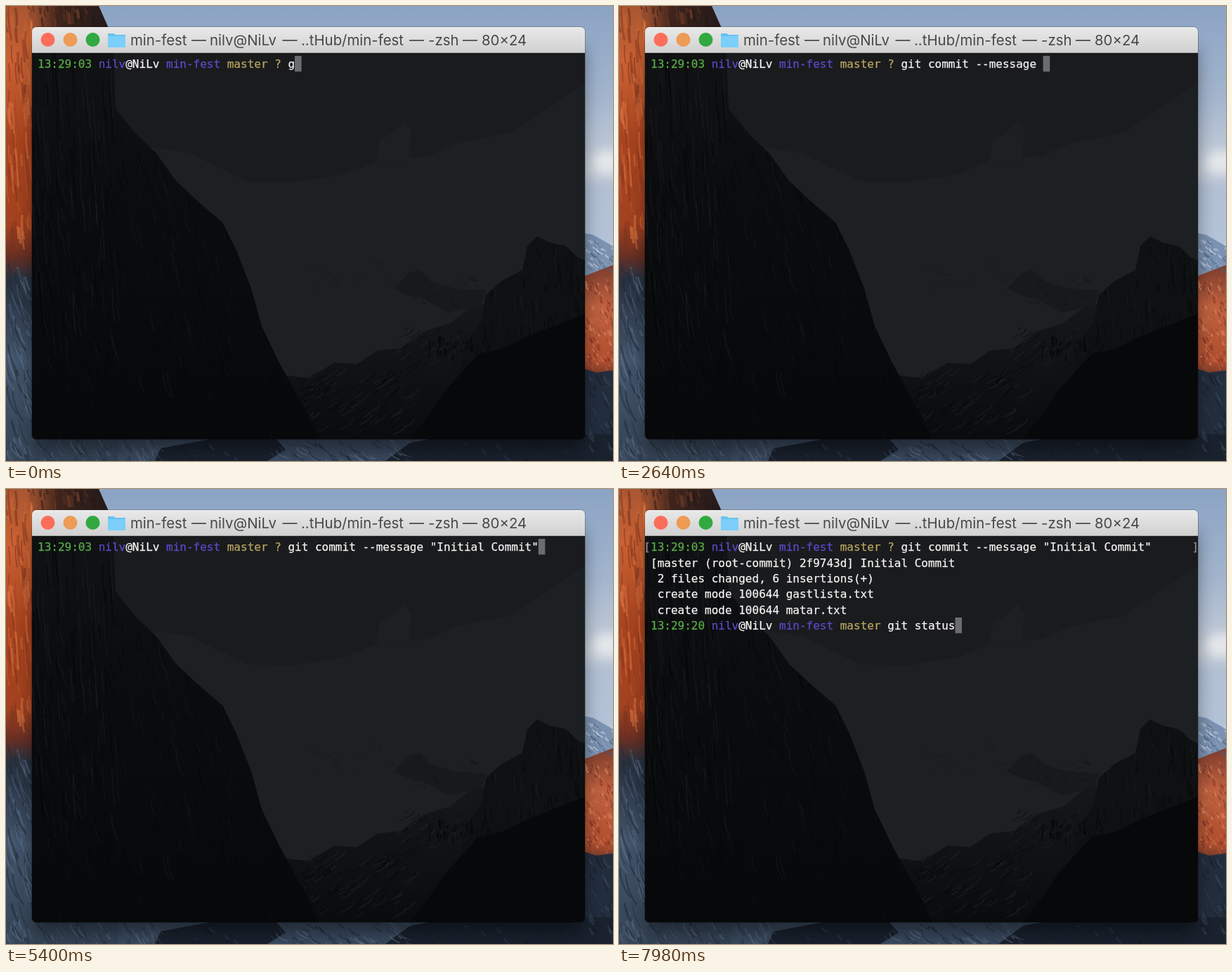
Animation of 864x648 px, one loop 8000 ms. Source, as an HTML page:

```html
<!DOCTYPE html>
<html lang="en">
<head>
<meta charset="utf-8">
<title>Terminal commit</title>
<style>
  html, body { margin: 0; width: 100%; height: 100%; overflow: hidden; background: #18202b; }
  svg { display: block; width: 100vw; height: 100vh; }
  text { white-space: pre; }
  .term { font: 16px "DejaVu Sans Mono", monospace; color: #f4f4f4; }
  .term text, .term tspan { fill: currentColor; stroke: currentColor; stroke-width: .25px; }
  .title { font: 20.4px Inter, sans-serif; fill: #484848; }
  .term .time { color: #58ad46; }
  .term .user { color: #594bcb; }
  .term .branch { color: #b9a661; }
  .term .mark { color: #929292; }
</style>
</head>
<body>
<svg id="stage" viewBox="0 0 864 648" preserveAspectRatio="none">
  <defs>
    <linearGradient id="sky" x2="0" y2="1">
      <stop offset="0" stop-color="#8ba3c4"/><stop offset=".2" stop-color="#a3b5cd"/>
      <stop offset=".31" stop-color="#bcc7d6"/><stop offset=".36" stop-color="#c9d0da"/>
      <stop offset=".4" stop-color="#b2c0d3"/><stop offset=".55" stop-color="#b3c3d9"/>
    </linearGradient>
    <linearGradient id="rock" x2="0" y2="1">
      <stop offset="0" stop-color="#a95631"/><stop offset=".12" stop-color="#ca6132"/>
      <stop offset=".3" stop-color="#a8431f"/><stop offset=".48" stop-color="#a3421f"/>
      <stop offset=".55" stop-color="#682f24"/><stop offset=".6" stop-color="#273140"/>
      <stop offset=".78" stop-color="#42546b"/><stop offset="1" stop-color="#354456"/>
    </linearGradient>
    <linearGradient id="shade">
      <stop offset=".2" stop-color="#2b1b18" stop-opacity="0"/>
      <stop offset=".5" stop-color="#2b1b18" stop-opacity=".85"/>
      <stop offset="1" stop-color="#21191b"/>
    </linearGradient>
    <linearGradient id="trees" x2="0" y2="1">
      <stop offset="0" stop-color="#7d3c2d"/><stop offset=".35" stop-color="#c0623f"/>
      <stop offset=".8" stop-color="#b04e2f"/><stop offset="1" stop-color="#4a2a28"/>
    </linearGradient>
    <linearGradient id="bar" x2="0" y2="1">
      <stop offset="0" stop-color="#e9e9e9"/><stop offset="1" stop-color="#d0d0d0"/>
    </linearGradient>
    <linearGradient id="cliff" x2="0" y2="1">
      <stop offset="0" stop-color="#111214"/><stop offset=".35" stop-color="#0b0c0e"/>
      <stop offset="1" stop-color="#07080a"/>
    </linearGradient>
    <linearGradient id="hill" x2="0" y2="1">
      <stop offset="0" stop-color="#15181a"/><stop offset="1" stop-color="#0a0b0c"/>
    </linearGradient>
    <filter id="soft" x="-20%" y="-20%" width="140%" height="140%"><feGaussianBlur stdDeviation="13"/></filter>
    <filter id="haze" x="-30%" y="-30%" width="160%" height="160%"><feGaussianBlur stdDeviation="7"/></filter>
    <clipPath id="win"><rect x="37" y="30" width="787" height="587" rx="6"/></clipPath>
    <clipPath id="wall"><path d="M0 0H132L148 36 160 648H0Z"/></clipPath>
    <clipPath id="face"><path d="M37 67H153L156 146 184 181 215 211 242 249 274 279 308 308 328 348 349 402 364 456 389 508 412 550 431 584 445 617H37Z"/></clipPath>
    <clipPath id="dome"><path d="M676 450L683 412 705 392 735 376 742 342 756 328 774 337 797 342 814 358 824 362V617H640L650 490Z"/></clipPath>
  </defs>

  <rect width="864" height="648" fill="url(#sky)"/>
  <ellipse cx="858" cy="222" rx="24" ry="16" fill="#e3e6ea" filter="url(#haze)"/>
  <path d="M815 322L836 326 864 342V392H815Z" fill="#7b92b1"/>
  <path d="M815 388L838 379 864 369V540H815Z" fill="url(#trees)"/>
  <path d="M815 514L840 522 864 519V648H815Z" fill="#222d3d"/>
  <rect y="610" width="815" height="38" fill="#3b4b60"/>
  <g clip-path="url(#wall)">
    <rect width="165" height="648" fill="url(#rock)"/>
    <rect width="150" height="40" fill="url(#shade)"/>
  </g>
  <path d="M212 648L220 630 290 617H385L398 632 372 648ZM540 648L575 622 640 610H864V648Z" fill="#1a222e"/>
  <g id="texture"></g>

  <rect x="39" y="60" width="783" height="572" rx="8" opacity=".45" filter="url(#soft)"/>
  <rect x="36.5" y="29.5" width="788" height="588" rx="6.5" fill="none" stroke="#000" stroke-opacity=".2"/>

  <g clip-path="url(#win)">
    <rect x="37" y="67" width="787" height="550" fill="#1a1b1d"/>
    <path d="M195 200L260 209 302 230 345 250 410 251 480 240 530 220 600 214 645 195 720 180 824 110V617H195Z" fill="#1c2022"/>
    <path d="M528 222L532 190 552 180 566 163 577 176 573 220Z" fill="#1c2022"/>
    <path d="M552 402L574 380 588 376 606 392 636 402 684 405 676 426 630 437 596 418 572 412Z" fill="#171a1c"/>
    <path d="M390 525L430 530 468 508 500 510 528 491 562 487 592 464 632 452 662 428 700 420 760 440V617H425Z" fill="url(#hill)"/>
    <g clip-path="url(#dome)">
      <rect x="640" y="320" width="184" height="297" fill="#0e1011"/>
      <g id="crag"></g>
    </g>
    <g id="slopes"></g>
    <path d="M575 617L600 585 625 548 650 520 672 496 706 488 748 468 824 438V617Z" fill="#07080a"/>
    <g clip-path="url(#face)">
      <rect x="37" y="67" width="410" height="550" fill="url(#cliff)"/>
      <g id="grain"></g>
    </g>
    <rect x="37" y="30" width="787" height="37" fill="url(#bar)"/>
    <path d="M42 30.5H819" stroke="#f0f0f0"/>
    <path d="M37 66.5H824" stroke="#aaa"/>
  </g>

  <circle cx="59.5" cy="48" r="10" fill="#fc6e59"/>
  <circle cx="91.5" cy="48" r="10" fill="#ed9b55"/>
  <circle cx="123.5" cy="48" r="10" fill="#31a940"/>
  <path d="M145 40Q145 39 146 39H153L156 41H169Q170 41 170 42V58Q170 59 169 59H146Q145 59 145 58Z" fill="#68c1f0"/>
  <path d="M145 43H170V58Q170 59 169 59H146Q145 59 145 58Z" fill="#7bcffa"/>
  <g id="title" class="title"></g>
  <rect id="cursor" y="71" width="9.6" height="22.4" fill="#6b6c6e"/>
  <g id="lines" class="term"></g>
</svg>

<script>
const LOOP = 8000, STEP = 60, CELL = 9.632, LEFT = 45, ROW = 22.4;
const COMMAND = 'git commit --message "Initial Commit"';
const NEXT = 'git status';
const ENTER = 5880;
// [ms, characters typed]
const typing = [[0, 1], [1560, 14], [2580, 21], [3960, 28], [5280, 37]];
const typingNext = [[6840, 0], [7860, 10]];

const $ = id => document.getElementById(id);
function add(parent, tag, attrs = {}, content = '') {
  const el = document.createElementNS('http://www.w3.org/2000/svg', tag);
  for (const k in attrs) el.setAttribute(k, attrs[k]);
  el.textContent = content;
  parent.append(el);
  return el;
}

let seed = 29;
function rnd(a = 0, b = 1) {
  seed = (seed * 16807) % 2147483647;
  return a + (b - a) * seed / 2147483647;
}

// Short jittered strokes spread over a box
function strokes(group, n, [x, y, w, h], [dx, dy], colors, width = 1.5, opacity = .5) {
  for (let i = 0; i < n; i++) {
    const k = rnd(.3, 1), j = () => rnd(-3, 3).toFixed(1);
    add(group, 'path', {
      d: `M${rnd(x, x + w).toFixed(1)} ${rnd(y, y + h).toFixed(1)}` +
         `q${j()} ${(dy * k / 2).toFixed(1)} ${(dx * k).toFixed(1)} ${(dy * k).toFixed(1)}`,
      fill: 'none', stroke: colors[i % colors.length],
      'stroke-width': rnd(.5, width).toFixed(1), opacity
    });
  }
}

function paintScene() {
  const rock = $('texture'), grain = $('grain'), slopes = $('slopes'), crag = $('crag');
  strokes(rock, 75, [0, -10, 38, 340], [4, 55], ['#e17a42', '#6b2c1b', '#d16a39', '#83351f'], 4);
  strokes(rock, 35, [30, -8, 98, 26], [3, 20], ['#5b3325', '#211716', '#8d4a2e'], 4);
  strokes(rock, 80, [0, 365, 38, 270], [17, 48], ['#61758d', '#222c39', '#4e6178', '#1e2733'], 3);
  strokes(rock, 70, [0, 612, 215, 35], [13, 22], ['#596c83', '#25303d'], 3);
  strokes(rock, 60, [385, 612, 180, 35], [17, 13], ['#647890', '#202b39'], 2.5);
  strokes(rock, 45, [215, 620, 640, 28], [8, 9], ['#303e50', '#121923'], 3);
  strokes(rock, 40, [824, 332, 40, 42], [9, 9], ['#c9d5e4', '#48617f'], 2.5, .6);
  strokes(rock, 110, [824, 384, 40, 132], [4, 9], ['#e39a78', '#6f3127', '#d57b56', '#852f20'], 3);
  strokes(rock, 45, [824, 520, 40, 115], [9, 16], ['#394a60', '#161e29'], 3);

  strokes(grain, 120, [37, 60, 118, 380], [5, 75], ['#1b1d20', '#050607'], 1.8, .65);
  strokes(grain, 170, [50, 180, 270, 350], [10, 40], ['#17191c', '#040506'], 1.4, .65);
  strokes(grain, 60, [60, 460, 330, 150], [10, 30], ['#111316', '#040506'], 1.3, .65);
  strokes(slopes, 130, [425, 512, 165, 90], [-18, 15], ['#1f2325', '#070809'], 1.8, .65);
  strokes(slopes, 60, [560, 456, 105, 55], [-15, 13], ['#1f2325', '#090b0c'], 1.8, .65);
  strokes(slopes, 35, [572, 384, 95, 40], [9, 7], ['#0e1112', '#1c2022'], 1.6, .7);
  strokes(slopes, 45, [600, 470, 90, 25], [0, 12], ['#050607'], 2, .8);
  strokes(slopes, 14, [430, 362, 130, 45], [13, 4], ['#15181a'], 1.2, .6);
  strokes(crag, 90, [680, 332, 144, 130], [2, 26], ['#191c1e', '#060708'], 1.8, .65);
}

function paintTitle() {
  const parts = [[177, 'min-fest'], [290, 'nilv@NiLv'], [420, '..tHub/min-fest'], [601, '-zsh'], [677, '80×24']];
  for (const [x, s] of parts) add($('title'), 'text', { x, y: 56 }, s);
  for (const x of [264, 393.5, 574, 650])
    add($('title'), 'rect', { x, y: 48.2, width: 21, height: 1.7 });
}

function line(row, col = 0, parent = $('lines')) {
  return add(parent, 'text', { x: LEFT + col * CELL, y: 88.2 + row * ROW });
}

function prompt(row, time, parent, mark = '') {
  const el = line(row, 0, parent);
  const runs = [['time', time + ' '], ['user', 'nilv'], ['', '@NiLv '], ['user', 'min-fest '],
                ['branch', 'master ' + mark]];
  for (const [cls, s] of runs) add(el, 'tspan', { class: cls }, s);
  return add(el, 'tspan');
}

paintScene();
paintTitle();
const typed = prompt(0, '13:29:03', $('lines'), '? ');
const result = add($('lines'), 'g');
[[0, -1, '[', 'mark'], [0, 80, ']', 'mark'],
 [1, 0, '[master (root-commit) 2f9743d] Initial Commit'],
 [2, 0, ' 2 files changed, 6 insertions(+)'],
 [3, 0, ' create mode 100644 gastlista.txt'],
 [4, 0, ' create mode 100644 matar.txt']].forEach(([row, col, s, cls = '']) => {
  const el = line(row, col, result);
  el.setAttribute('class', cls);
  el.textContent = s;
});
const typedNext = prompt(5, '13:29:20', result);

function count(keys, t) {
  if (t <= keys[0][0]) return keys[0][1];
  for (let i = 1; i < keys.length; i++) {
    const [t0, n0] = keys[i - 1], [t1, n1] = keys[i];
    if (t < t1) return Math.floor(n0 + (n1 - n0) * (t - t0) / (t1 - t0));
  }
  return keys[keys.length - 1][1];
}

function render(ms) {
  const t = Math.floor(ms % LOOP / STEP) * STEP;
  const done = t >= ENTER;
  const n = count(typing, t), m = count(typingNext, t);
  typed.textContent = COMMAND.slice(0, n);
  typedNext.textContent = NEXT.slice(0, m);
  result.setAttribute('visibility', done ? 'visible' : 'hidden');
  $('cursor').setAttribute('x', LEFT + CELL * (done ? 35 + m : 37 + n));
  $('cursor').setAttribute('y', 71 + (done ? 5 * ROW : 0));
}

const start = performance.now();
function tick() {
  render(performance.now() - start);
  requestAnimationFrame(tick);
}
tick();
</script>
</body>
</html>
```
